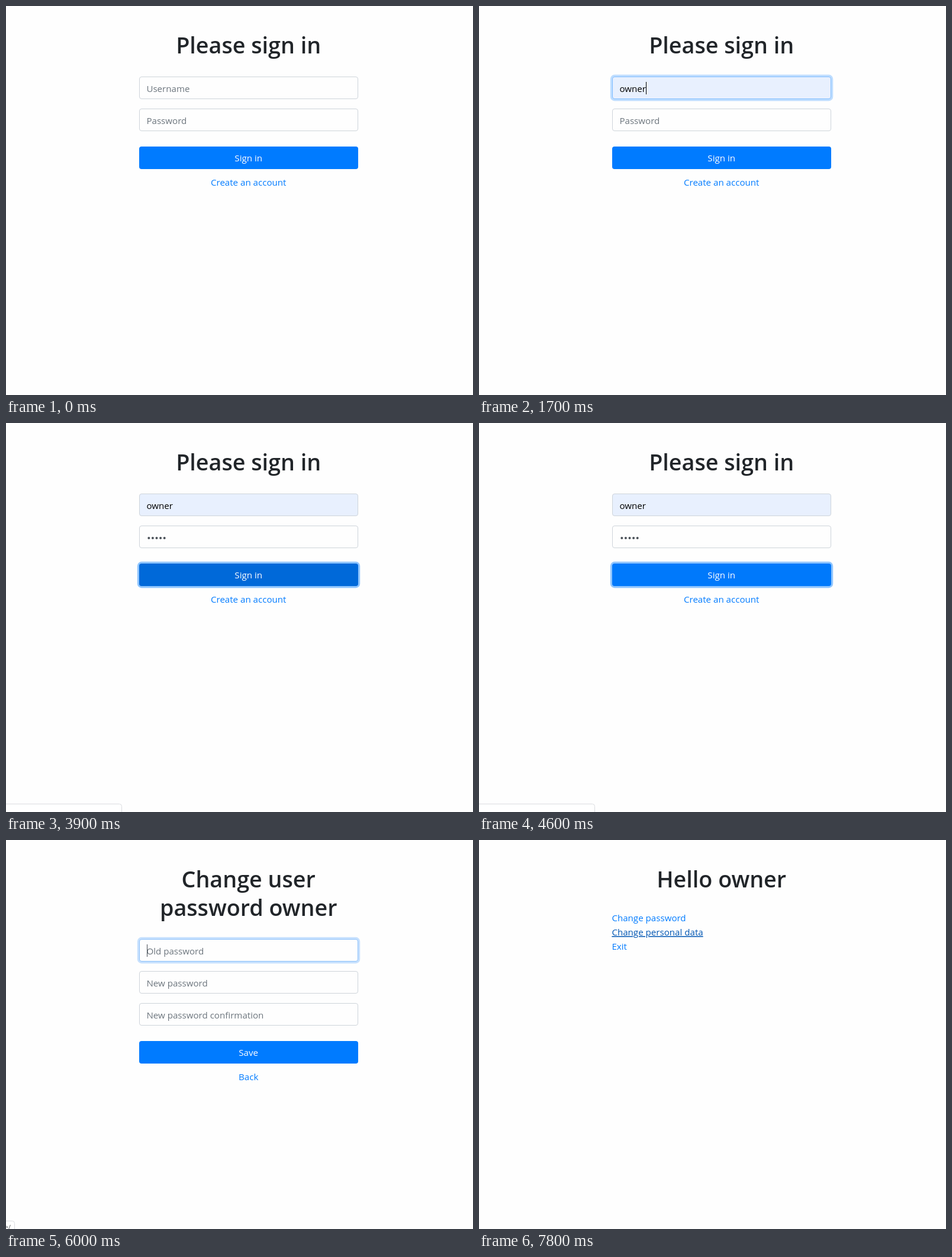
An HTML page that plays this animation: 789x656 px, repeating every 8 s.

```html
<!DOCTYPE html>
<html lang="en">
<head>
<meta charset="utf-8">
<title>Sign in</title>
<style>
  html, body { margin: 0; width: 100%; height: 100%; overflow: hidden; background: #fefefe; }
  svg { display: block; font: 15.12px "Open Sans", "Noto Sans", sans-serif; }
  .title { font-size: 37.7px; font-weight: 600; fill: #212529; }
  .link { fill: #007bff; }
  .link.hover {
    fill: #0056b3;
    text-decoration: underline 1px;
    text-underline-offset: 1px;
  }
  .placeholder { fill: #6c757d; }
  .status { font-size: 11.5px; fill: #5f6368; }
  .center { text-anchor: middle; }
  .end { text-anchor: end; }
</style>
</head>
<body>
<svg id="stage" width="789" height="656" viewBox="0 0 789 656"></svg>
<script>
const LOOP = 8000, STEP = 100, FADE = 150;
const LEFT = 225, WIDTH = 370, MIDDLE = 409.7, HEIGHT = 38;
const TEXT_X = 237.4, CARET_X = 238;
const USER = "owner", USER_END = 282, BULLET = 6.6;
const stage = document.getElementById("stage");

const within = (t, from, to) => t >= from && t < to;

// Eased 0..1 transition that begins at the given time
function fade(t, start) {
  const p = Math.min(1, Math.max(0, (t - start) / FADE));
  return p * p * (3 - 2 * p);
}

const pulse = (t, start, end) => fade(t, start) - fade(t, end);

function mix(from, to, p) {
  return `rgb(${from.map((v, i) => Math.round(v + (to[i] - v) * p))})`;
}

const text = (label, x, y, kind, extra = "") =>
  `<text x="${x}" y="${y}" class="${kind}" ${extra}>${label}</text>`;

const title = (label, y = 80) => text(label, MIDDLE, y, "title center");

const link = (label, x, y, hover, kind = "") =>
  text(label, x, y, `link ${kind} ${hover ? "hover" : ""}`);

const caret = (x, top, color = "#495057") =>
  `<rect x="${x}" y="${top + 9}" width="1" height="21" fill="${color}"/>`;

const ring = (top, color, opacity) => opacity <= 0 ? "" :
  `<rect x="${LEFT - 3.2}" y="${top - 3.2}" width="${WIDTH + 6.4}" height="${HEIGHT + 6.4}"
    rx="7.2" fill="${color}" opacity="${opacity}"/>`;

function field(top, focus, content, fill = "#fefefe") {
  const border = mix([206, 212, 218], [128, 189, 255], focus);
  return ring(top, "#007bff", 0.25 * focus) +
    `<rect x="${LEFT + 0.5}" y="${top + 0.5}" width="${WIDTH - 1}" height="${HEIGHT - 1}"
      rx="3.5" fill="${fill}" stroke="${border}"/>` + content;
}

const placeholder = (label, top) => text(label, TEXT_X, top + 26, "placeholder");

function button(label, top, hover, focus = 0) {
  const fill = mix([0, 123, 255], [0, 105, 217], hover);
  return ring(top, "#268fff", 0.5 * focus) +
    `<rect x="${LEFT}" y="${top}" width="${WIDTH}" height="${HEIGHT}" rx="4" fill="${fill}"/>` +
    text(label, MIDDLE, top + 25, "center", 'fill="#fff"');
}

function bullets(count, y) {
  let dots = "";
  for (let i = 0; i < count; i++)
    dots += `<circle cx="${CARET_X + BULLET * (i + 0.5)}" cy="${y}" r="2" fill="#495057"/>`;
  return dots;
}

function statusBubble(width, label, opacity) {
  return `<g opacity="${opacity}">
    <rect x="-9.5" y="642.5" width="${width + 9}" height="30" rx="4" fill="#fff" stroke="#dadce0"/>
    ${text(label, width - 7, 657, "status end")}</g>`;
}

function signInPage(t) {
  const filled = t >= 1400;
  let user = filled ? text(USER, TEXT_X, 145, "") : placeholder("Username", 119);
  if (within(t, 900, 1400)) user += caret(CARET_X, 119);
  if (within(t, 1700, 2100)) user += caret(USER_END, 119, "#000");

  const typed = t < 2700 ? 0 : t < 2800 ? 2 : 5;
  let password = typed ? bullets(typed, 194) : placeholder("Password", 173);
  if (within(t, 2600, 3300)) password += caret(Math.round(CARET_X + BULLET * typed), 173);

  const pressed = within(t, 3400, 3500) ? 0.4 : 0;
  const hover = t >= 4600 ? 0.1 : fade(t, 3015) + pressed;
  return title("Please sign in") +
    field(119, pulse(t, 840, 2540), user, filled ? "#e8f0fe" : undefined) +
    field(173, pulse(t, 2540, 3240), password) +
    button("Sign in", 237, hover, fade(t, 3240)) +
    link("Create an account", MIDDLE, 303, false, "center");
}

function homePage(hovered) {
  return title(`Hello ${USER}`) +
    ["Change password", "Change personal data", "Exit"]
      .map((label, i) => link(label, LEFT - 0.6, 137 + 24 * i, i === hovered)).join("");
}

function passwordPage(t) {
  const blink = within(t, 6000, 6500) || within(t, 7000, 7100);
  return title("Change user") + title(`password ${USER}`, 128) +
    field(167, pulse(t, 5885, 7040),
      placeholder("Old password", 167) + (blink ? caret(CARET_X, 167) : "")) +
    field(221, 0, placeholder("New password", 221)) +
    field(275, 0, placeholder("New password confirmation", 275)) +
    button("Save", 339, within(t, 6700, 6800) ? 0.4 : 0) +
    link("Back", MIDDLE, 405, t >= 6800, "center");
}

function page(t) {
  if (t < 4900) return signInPage(t);
  if (t < 6000) return homePage(t >= 5300 ? 0 : -1);
  if (t < 7300) return passwordPage(t);
  return homePage(t >= 7800 ? 1 : -1);
}

function status(t) {
  if (within(t, 3900, 5400)) return statusBubble(196, "", 1);
  if (within(t, 5400, 6300)) return statusBubble(15, "e/", Math.min(1, (6300 - t) / 300));
  return "";
}

let shown = -1;
function draw(now) {
  const t = Math.floor((now % LOOP) / STEP) * STEP;
  if (t !== shown) {
    shown = t;
    stage.innerHTML = page(t) + status(t);
  }
  requestAnimationFrame(draw);
}
draw(performance.now());
</script>
</body>
</html>
```
